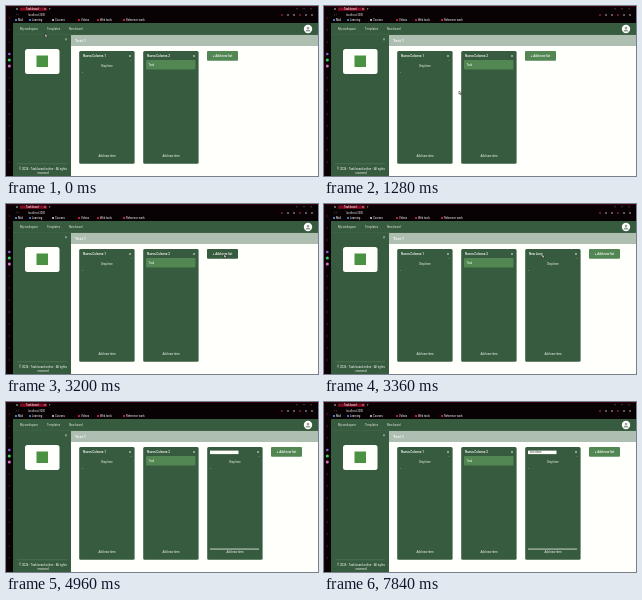
An HTML page that plays this animation: 312 by 170 pixels, repeating every 8 s.

```html
<!DOCTYPE html>
<html lang="en">
<head>
<meta charset="utf-8">
<title>Task board</title>
<style>
  html, body { margin: 0; width: 100%; height: 100%; overflow: hidden; background: #fff; }
  svg { display: block; width: 312px; height: 170px; }
  text { font-family: Roboto, Arial, sans-serif; fill: #fff; }
</style>
</head>
<body>
<svg id="stage" viewBox="0 0 312 170"></svg>
<script>
const GREEN = '#375b3e', LIGHT = '#528653', WHITE = '#fffffc', LOOP = 8000, STEP = 80;
const HOVER = 2320, ADDED = 3360, EDIT = 4080, CLEARED = 4960;

const rect = (x, y, w, h, fill, extra = '') =>
  `<rect x="${x}" y="${y}" width="${w}" height="${h}" fill="${fill}" ${extra}/>`;
const dot = (x, y, r, fill) => `<circle cx="${x}" cy="${y}" r="${r}" fill="${fill}"/>`;
const text = (x, y, size, label, extra = '') =>
  `<text x="${x}" y="${y}" font-size="${size}" ${extra}>${label}</text>`;
const middle = 'text-anchor="middle"';
const cross = (x, y, r = .9) =>
  `<path d="M${x - r} ${y - r}l${2 * r} ${2 * r}m0 ${-2 * r}l${-2 * r} ${2 * r}" stroke="#fff" stroke-width=".5"/>`;

function column(x, title, task, id) {
  const body = task
    ? rect(x + 3, 54, 49.5, 9.5, LIGHT, 'rx="1"') + text(x + 5.5, 59.6, 2.7, task)
    : text(x + 28, 61, 2.7, 'Drop here', middle) + dot(x + 3.6, 66.3, .4, '#bdcbbf') + dot(x + 52, 54.3, .4, '#bdcbbf');
  return `<g id="${id}">` + rect(x + .2, 45, 55.4, 112.8, GREEN, 'rx="1.5"') +
    text(x + 4, 51.2, 3, title, 'font-weight="500" class="title"') +
    cross(x + 51, 50) + body +
    text(x + 28, 151, 2.8, 'Add new item', middle) + '</g>';
}

function browser() {
  let s = rect(0, 0, 312, 170, '#090205') + rect(0, 0, 312, .9, '#3b0010') +
    rect(0, 0, 1, 170, '#25000a') + rect(14, 1.4, 27, 3.4, '#7d0b22', 'rx=".6"') +
    dot(11, 3, .8, '#d9d9d9') + text(20, 4, 2.6, 'Task board') +
    cross(39, 3, .6) + text(43, 4, 2.8, '+') +
    text(10, 10.3, 3, '‹  ›', 'opacity=".7"') + text(22, 10.3, 2.6, 'localhost:3000', 'opacity=".9"');
  ['Mail', 'Learning', 'Courses', 'Videos', 'Web tools', 'Reference work']
    .forEach((label, i) => {
      const x = [10, 24, 47, 73, 92, 118][i];
      s += dot(x, 14, 1.1, ['#5b9ee8', '#4f90df', '#c8d0df', '#e52945', '#e52945', '#e52945'][i]) +
        text(x + 2, 15, 2.7, label);
    });
  for (let i = 0; i < 6; i++) s += dot(276 + i * 6, 9, .8, i % 3 ? '#c9c3c5' : '#d23a4b');
  for (let i = 0; i < 3; i++) s += dot(291 + i * 7, 2.8, .5, '#9b8c91');
  for (let y = 12; y < 160; y += 12) s += dot(3.3, y, .7, '#5c1527');
  return s + dot(3.3, 48, 1.3, '#8760dc') + dot(3.3, 54, 1.6, '#35d05b') + dot(3.3, 60, 1.5, '#d575c4');
}

const page = rect(7, 17, 305, 153, WHITE) +
  rect(7, 17, 305, 12, GREEN) + rect(7, 29, 58, 141, GREEN) +
  rect(7, 28.7, 305, .3, '#4d7054') + rect(65, 29, 247, 11, '#aebfb1') +
  text(14, 24.1, 2.8, 'My workspace', 'opacity=".85"') + text(41, 24.1, 2.8, 'Templates', 'opacity=".85"') +
  text(63, 24.1, 2.8, 'New board', 'opacity=".85"') +
  dot(302, 23, 4.2, WHITE) + dot(302, 22, 1.3, '#97a39a') +
  '<path d="M299.5 25.5a2.5 2 0 0 1 5 0z" fill="#97a39a"/>' +
  text(69, 36.2, 4, 'Test 1', 'font-weight="500"') +
  cross(60, 33.3, .8) + rect(19, 43, 34.5, 25, WHITE, 'rx="2.5"') +
  rect(30.5, 49.5, 11.5, 11.5, '#4a9142') +
  rect(11, 157.7, 50, .4, '#6c8972') +
  text(37, 163.8, 2.9, '© 2024 - Task board online - All rights', middle) +
  text(37, 167.5, 2.9, 'reserved', middle);

document.getElementById('stage').innerHTML = browser() + page +
  column(73, 'Nuova Colonna 1', '', 'first') + column(137, 'Nuova Colonna 2', 'Task', 'second') +
  column(201, 'New Long', '', 'third') +
  '<g id="editor">' + rect(204, 48.6, 28.5, 3.5, WHITE) +
  rect(205.5, 48.9, 14, 2.9, '#9bb8df', 'id="selection"') +
  text(205.7, 51.4, 2.9, '', 'id="typed" style="fill:#263c2b"') +
  rect(204, 146.6, 49, .9, '#dce4dd') + '</g>' +
  '<g id="add">' + rect(201, 45, 31, 9.8, LIGHT, 'rx="1" id="addBox"') +
  text(216.5, 51, 3.1, '+ Add new list', middle + ' font-weight="500"') + '</g>' +
  '<path id="cursor" d="M0 0v3.3l.9-.8.7 1.4.7-.3-.7-1.4h1.2z" fill="#fff" stroke="#111" stroke-width=".45"/>';

const get = id => document.getElementById(id);
const [third, editor, selection, typed, add, addBox, cursor] =
  ['third', 'editor', 'selection', 'typed', 'add', 'addBox', 'cursor'].map(get);
const thirdTitle = third.querySelector('.title');
const show = (node, on) => node.setAttribute('visibility', on ? 'inherit' : 'hidden');

// Pointer stops: time, x, y
const path = [[0, 39, 28], [80, 39, 28], [880, 129, 81], [1120, 129, 81], [1280, 135, 85], [1760, 135, 85],
  [1840, 147, 66], [1920, 147, 66], [2160, 232, 37], [2240, 232, 37], [2320, 228, 48],
  [2720, 228, 48], [3040, 218, 50.5], [LOOP, 218, 50.5]];
const keyTimes = [5520, 5680, 5920, 6160, 6640, 7040, 7280, 7520, 7840];

function pointer(t) {
  const i = path.findIndex(p => p[0] > t);
  const [t0, x0, y0] = path[i - 1], [t1, x1, y1] = path[i];
  const k = (t - t0) / (t1 - t0);
  return [x0 + (x1 - x0) * k, y0 + (y1 - y0) * k];
}

function draw(now) {
  const t = Math.floor(now % LOOP / STEP) * STEP;
  const editing = t >= EDIT;
  show(third, t >= ADDED);
  third.style.display = t >= ADDED ? '' : 'none';
  show(thirdTitle, !editing);
  show(editor, editing);
  show(selection, editing && t < CLEARED);
  typed.textContent = t < CLEARED ? 'New Long' : 'List done'.slice(0, keyTimes.filter(k => k <= t).length);
  add.setAttribute('transform', `translate(${t >= ADDED ? 64 : 0})`);
  addBox.setAttribute('fill', t >= HOVER && t < ADDED ? GREEN : LIGHT);
  cursor.setAttribute('transform', `translate(${pointer(t)})`);
  show(cursor, !editing);
  requestAnimationFrame(draw);
}
draw(0);
</script>
</body>
</html>
```
